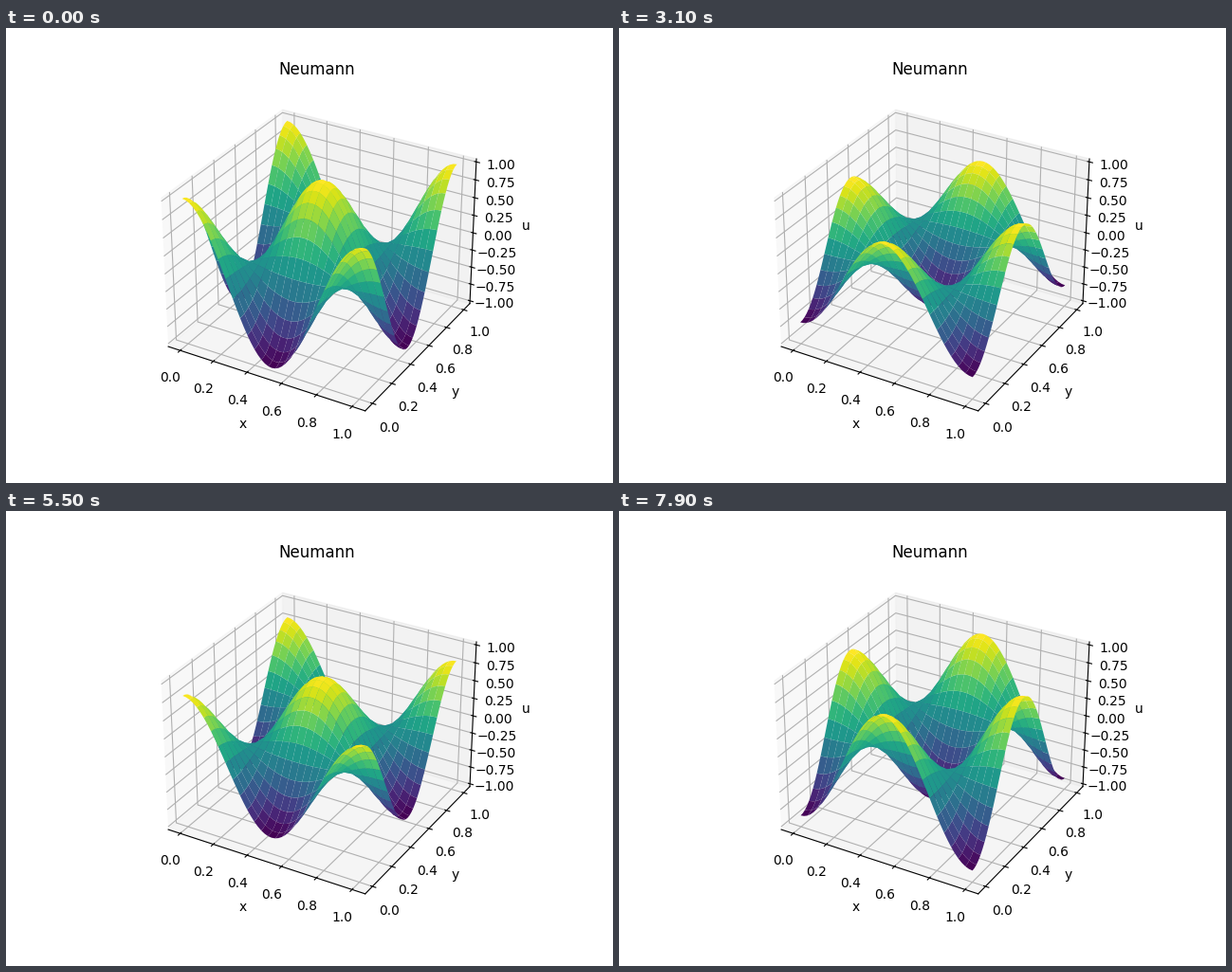
A matplotlib script that plays this animation: 640x480 px, repeating every 8000 ms.

```python
import numpy as np
import matplotlib.pyplot as plt
from matplotlib.animation import FuncAnimation

FRAMES = 80
INTERVAL = 100   # ms
PERIOD = 50      # frames per oscillation

s = np.linspace(0, 1, 51)
X, Y = np.meshgrid(s, s)
MODE = np.cos(2 * np.pi * X) * np.cos(2 * np.pi * Y)


def padded(lo, hi):
    pad = (hi - lo) / 48
    return lo - pad, hi + pad


fig = plt.figure(figsize=(6.4, 4.8), dpi=100)
ax = fig.add_subplot(projection="3d")
ax.set_title("Neumann")
ax.set_xlabel("x")
ax.set_ylabel("y")
ax.set_zlabel("u")
ax.set_xlim(*padded(-0.05, 1.05))
ax.set_ylim(*padded(-0.05, 1.05))
ax.set_zlim(*padded(-1, 1))

surfaces = []


def draw(i):
    while surfaces:
        surfaces.pop().remove()
    u = np.cos(2 * np.pi * i / PERIOD) * MODE
    surfaces.append(ax.plot_surface(X, Y, u, cmap="viridis"))
    return surfaces


anim = FuncAnimation(fig, draw, frames=FRAMES, init_func=lambda: draw(0),
                     interval=INTERVAL, repeat=True, repeat_delay=0)
plt.show()
```
